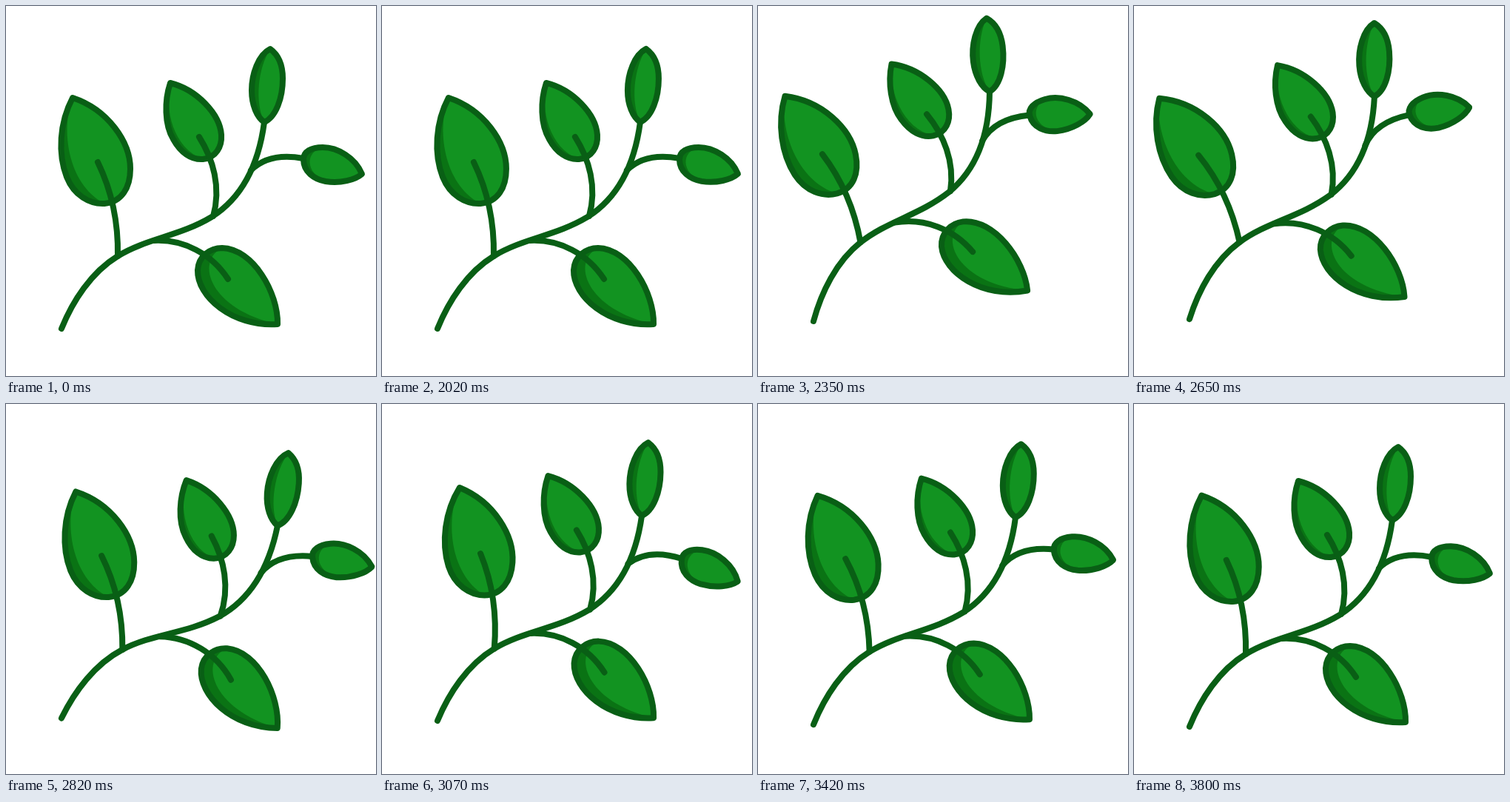
An HTML page that plays this animation: 500x500 px, repeating every 3.82 s.

```html
<!DOCTYPE html>
<html lang="en">
<head>
<meta charset="utf-8">
<title>Swaying twig</title>
<style>
  html, body { margin: 0; width: 100%; height: 100%; overflow: hidden; background: #fff; }
  svg { display: block; width: 100vw; height: 100vh; }
  .line { fill: none; stroke: #095f15; stroke-width: 8; stroke-linecap: round; stroke-linejoin: round; }
  .shade { fill: #0a7314; }
  .light { fill: #129321; }
</style>
</head>
<body>
<svg viewBox="0 0 500 500">
  <g id="twig">
    <path class="line" d="M75,436 C90,399 115,360 151,338 C190,314 235,311 278,285 C322,257 342,210 349,157"/>
  </g>
</svg>
<script>
const LOOP = 3820;
const twig = document.getElementById('twig');

function add(parent, tag, attrs = {}) {
  const el = document.createElementNS('http://www.w3.org/2000/svg', tag);
  for (const name in attrs) el.setAttribute(name, attrs[name]);
  return parent.appendChild(el);
}

// The shaded side runs from start along `outer`; `inner` is the edge of the light area.
function addLeaf({ start, outer, inner, rest, stalk }) {
  const group = add(twig, 'g');
  const outline = `M${start} ${outer} ${rest} Z`;
  add(group, 'path', { class: 'shade', d: outline });
  add(group, 'path', { class: 'light', d: `M${start} ${inner} ${rest} Z` });
  add(group, 'path', { class: 'line', d: outline });
  if (stalk) add(group, 'path', { class: 'line', d: stalk });
  return group;
}

const leftLeaf = addLeaf({
  start: '90,124',
  outer: 'C72,158 70,200 82,231 C92,256 113,268 133,267',
  inner: 'C74,165 82,240 133,267',
  rest: 'C156,265 168,246 168,220 C168,184 138,140 90,124',
  stalk: 'M124,211 C142,248 152,290 151,338'
});
addLeaf({
  start: '222,104',
  outer: 'C214,128 214,160 226,180 C236,198 250,208 266,207',
  inner: 'C214,140 226,192 266,207',
  rest: 'C284,205 292,190 291,174 C289,146 258,113 222,104',
  stalk: 'M261,177 C280,207 291,245 280,284'
});
addLeaf({
  start: '357,58',
  outer: 'C341,66 332,92 332,114 C332,134 339,150 349,157',
  inner: 'C340,85 336,130 349,157',
  rest: 'C365,150 374,124 374,98 C374,80 368,66 357,58'
});
const rightLeaf = addLeaf({
  start: '428,191',
  outer: 'C412,191 402,197 402,207 C402,224 416,234 432,237',
  inner: 'C404,197 404,225 432,237',
  rest: 'C452,240 472,235 481,227 C472,205 448,191 428,191',
  stalk: 'M402,206 C375,201 350,203 331,222'
});
addLeaf({
  start: '292,327',
  outer: 'C276,327 260,338 259,357 C258,392 305,434 367,430',
  inner: 'C255,345 275,410 367,430',
  rest: 'C368,388 334,328 292,327',
  stalk: 'M200,317 C240,315 278,335 300,369'
});

// Keys are [time in ms, value], eased in and out.
const lift = [[2010, 0], [2515, -13.3], [3800, 0]];
const sway = [[2010, 0], [2515, -9.3], [2869, 4.5], [3242, -2.75], [3515, 0.75], [3800, 0]];
const flutter = [[2010, 0], [2680, -17.4], [3034, 7.1], [3407, -4.6], [3674, 1.4], [3930, 0]];

function valueAt(keys, t) {
  if (t <= keys[0][0]) return keys[0][1];
  for (let i = 1; i < keys.length; i++) {
    const [t0, v0] = keys[i - 1], [t1, v1] = keys[i];
    if (t < t1) {
      const u = (t - t0) / (t1 - t0);
      return v0 + (v1 - v0) * u * u * (3 - 2 * u);
    }
  }
  return keys[keys.length - 1][1];
}

function draw(t) {
  const bend = valueAt(flutter, t);
  twig.setAttribute('transform', `translate(0 ${valueAt(lift, t)}) rotate(${valueAt(sway, t)} 75 436)`);
  leftLeaf.setAttribute('transform', `rotate(${bend * 0.49} 151 338)`);
  rightLeaf.setAttribute('transform', `rotate(${bend} 331 222)`);
}

const begin = performance.now();
function tick() {
  draw((performance.now() - begin) % LOOP);
  requestAnimationFrame(tick);
}
tick();
</script>
</body>
</html>
```
